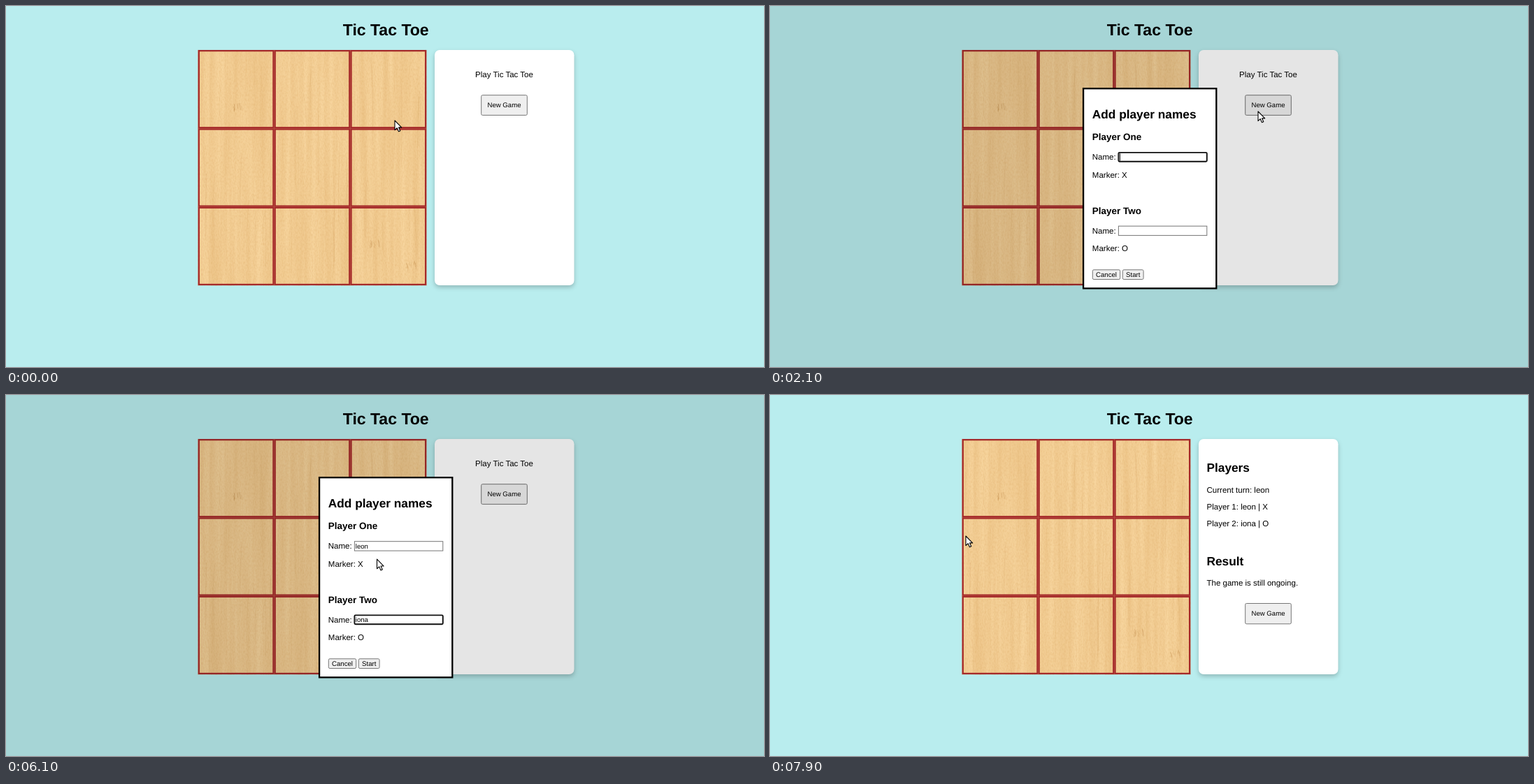
These frames come from a looping animation (1084 by 517 pixels, 8000 ms). An HTML page:

```html
<!DOCTYPE html>
<html lang="en">
<head>
<meta charset="utf-8">
<title>Tic Tac Toe</title>
<style>
  html, body { margin: 0; width: 100%; height: 100%; overflow: hidden; background: #b9edee; }
  svg { display: block; width: 1084px; height: 517px; }
  text { font-family: "Liberation Sans", Arial, sans-serif; font-size: 11.52px; text-rendering: geometricPrecision; white-space: pre; }
  .h1 { font-size: 23.04px; font-weight: bold; }
  .h2 { font-size: 17.28px; font-weight: bold; }
  .h3 { font-size: 13.48px; font-weight: bold; }
  .small { font-size: 9.6px; }
  .mid { text-anchor: middle; }
  .panel { filter: drop-shadow(0 3px 3px rgba(0, 0, 0, .22)); }
</style>
</head>
<body>
<svg id="stage" viewBox="0 0 1084 517">
  <defs>
    <filter id="grain" x="0" y="0" width="1" height="1" color-interpolation-filters="sRGB">
      <feTurbulence type="fractalNoise" baseFrequency=".11 .004" numOctaves="3" seed="8"/>
      <feColorMatrix values="0 0 0 0 .8  0 0 0 0 .56  0 0 0 0 .26  .36 0 0 0 -.08"/>
    </filter>
    <filter id="speck" x="0" y="0" width="1" height="1" color-interpolation-filters="sRGB">
      <feTurbulence type="fractalNoise" baseFrequency=".6 .3" numOctaves="2" seed="3"/>
      <feColorMatrix values="0 0 0 0 .8  0 0 0 0 .56  0 0 0 0 .26  .36 0 0 0 -.13"/>
    </filter>
  </defs>
  <rect width="1084" height="517" fill="#b9edee"/>
  <text class="h1 mid" x="543.2" y="42">Tic Tac Toe</text>
  <g id="board"></g>
  <rect class="panel" x="613" y="63" width="199.5" height="337" rx="7.2" fill="#fff"/>
  <g id="intro"></g>
  <g id="info"></g>
  <rect id="shade" width="1084" height="517" opacity=".1"/>
  <g id="dialog"></g>
  <path id="cursor" d="M0 0V13.6L3.2 10.7L5.5 15.8L7.8 14.8L5.6 9.9H9.7Z" fill="#fff" stroke="#000" stroke-width="1.1" stroke-linejoin="round"/>
</svg>
<script>
const LOOP = 8000, STEP = 100;
const NAMES = ['leon', 'iona'];
const BUTTON_LOOK = { idle: ['#efefef', '#767676'], hover: ['#e5e5e5', '#4f4f4f'], down: ['#f5f5f5', '#8d8d8d'] };
const $ = id => document.getElementById(id);

function add(parent, tag, attrs, text) {
  const el = document.createElementNS('http://www.w3.org/2000/svg', tag);
  set(el, attrs);
  if (text) el.textContent = text;
  return parent.appendChild(el);
}
function set(el, attrs) {
  for (const key in attrs) el.setAttribute(key, attrs[key]);
}
// Baselines sit on whole pixels
const label = (parent, x, y, text, cls = '') => add(parent, 'text', { x, y: Math.round(y), class: cls }, text);
const show = (el, on) => set(el, { visibility: on ? 'visible' : 'hidden' });

function button(parent, x, y, width, height, text) {
  const box = add(parent, 'rect', { x, y, width, height, rx: 1.8 });
  label(parent, x + width / 2, y + height / 2 + 3.2, text, 'small mid');
  const over = (px, py) => px >= x && px <= x + width && py >= y && py <= y + height;
  const draw = (px, py, down) => {
    const [fill, stroke] = BUTTON_LOOK[!over(px, py) ? 'idle' : down ? 'down' : 'hover'];
    set(box, { fill, stroke });
  };
  draw(0, 0);
  return draw;
}

function field(parent, y) {
  const box = add(parent, 'rect', { x: 498.4, width: 126.4, fill: '#fff' });
  const value = label(parent, 499.8, y + 10.5, '', 'small');
  const caret = add(parent, 'rect', { y: y + 1.8, width: .9, height: 10.6 });
  return (text, focus, caretOn) => {
    set(box, focus
      ? { y: y + .6, height: 12.8, rx: 1.4, stroke: '#101010', 'stroke-width': 1.9 }
      : { y: y + .4, height: 13.4, rx: 0, stroke: '#767676', 'stroke-width': 1 });
    value.textContent = text;
    set(caret, { x: 500 + (text ? value.getComputedTextLength() : 0) });
    show(caret, focus && caretOn);
  };
}

function drawBoard(g) {
  const left = 274.7, top = 63, cellW = 108.85, cellH = 112.35, line = 2.2;
  const area = { x: left, y: top, width: 3 * cellW, height: 3 * cellH };
  let seed = 21;
  const rnd = (min, max) => {
    seed = seed * 16807 % 2147483647;
    return min + (max - min) * seed / 2147483647;
  };
  const strand = (x, y, bend, len, opacity) => add(g, 'path', {
    d: `M${x} ${y}q${bend} ${len / 2} ${bend / 2} ${len}`,
    fill: 'none', stroke: '#b98342', 'stroke-opacity': opacity, 'stroke-width': .8
  });

  add(g, 'rect', { ...area, fill: '#f7d59e' });
  for (const id of ['grain', 'speck']) add(g, 'rect', { ...area, filter: `url(#${id})` });
  for (let i = 0; i < 60; i++) {
    const len = rnd(40, 130);
    strand(rnd(left + 4, left + area.width - 4), rnd(top, top + area.height - len), rnd(-6, 6), len, rnd(.06, .17));
  }
  for (const [x, y] of [[333, 146], [527, 342], [579, 372]]) {
    for (let i = 0; i < 7; i++) strand(x + rnd(-8, 8), y - rnd(2, 8), rnd(-3, 5), rnd(5, 12), rnd(.2, .45));
  }

  for (let i = 0; i < 9; i++) {
    add(g, 'rect', {
      x: left + i % 3 * cellW + line / 2, y: top + Math.floor(i / 3) * cellH + line / 2,
      width: cellW - line, height: cellH - line,
      fill: 'none', stroke: '#a52a2a', 'stroke-width': line + .1
    });
  }
}

drawBoard($('board'));

const intro = $('intro'), info = $('info'), dialog = $('dialog');
label(intro, 712.5, 102, 'Play Tic Tac Toe', 'mid');
const newGame = button(intro, 679.7, 127.7, 65.6, 28.7, 'New Game');

label(info, 624.5, 110, 'Players', 'h2');
['Current turn: ' + NAMES[0], `Player 1: ${NAMES[0]} | X`, `Player 2: ${NAMES[1]} | O`]
  .forEach((text, i) => label(info, 624.5, 139.6 + 24.4 * i, text));
label(info, 624.5, 244, 'Result', 'h2');
label(info, 624.5, 273.4, 'The game is still ongoing.');
button(info, 679.7, 298.5, 65.6, 29.3, 'New Game');

add(dialog, 'rect', { x: 448.1, y: 118.2, width: 190.2, height: 286.2, fill: '#fff', stroke: '#000', 'stroke-width': 2.3 });
label(dialog, 460.8, 161, 'Add player names', 'h2');
const fields = [['One', 'X'], ['Two', 'O']].map(([nth, mark], i) => {
  const y = 192.1 + 105.5 * i;
  label(dialog, 460.8, y, 'Player ' + nth, 'h3');
  label(dialog, 460.8, y + 28.1, 'Name:');
  label(dialog, 460.8, y + 53.7, 'Marker: ' + mark);
  return field(dialog, y + 17.2);
});
button(dialog, 461.3, 377.8, 39.4, 13.7, 'Cancel');
const start = button(dialog, 504.3, 377.8, 29.8, 13.7, 'Start');

// Each move is a Bezier curve: begin, end, optional bends, goal
const HOME = [556, 164];
const moves = [
  [300, 1000, [330, 50], [470, 400], [619, 180]],
  [1200, 1900, [698, 151]],
  [2200, 2400, [531, 204]],
  [2900, 3000, [531, 206]],
  [6000, 6600, [528, 381]],
  [6900, 7800, [690, 440], [600, 250], [409, 213]],
  [7800, 7900, [280, 202]]
];

function bezier(points, k) {
  if (points.length === 1) return points[0];
  return bezier(points.slice(1).map((p, i) => p.map((v, axis) => points[i][axis] + (v - points[i][axis]) * k)), k);
}

function pointer(t) {
  let pos = HOME;
  for (const [begin, end, ...points] of moves) {
    if (t > begin) pos = bezier([pos, ...points], Math.min(1, (t - begin) / (end - begin)));
  }
  return pos;
}

const within = (t, from, to) => t >= from && t < to;
// Letters come in two quick pairs
const typed = (name, first, t) => name.slice(0, [0, 100, 300, 350].filter(wait => t >= first + wait).length);

function render(time) {
  const t = Math.floor(time / STEP) * STEP;
  const [x, y] = pointer(t);
  const open = within(t, 2100, 6800);

  show(intro, t < 6800);
  show(info, t >= 6800);
  show($('shade'), open);
  set(dialog, { display: open ? 'inline' : 'none' });

  newGame(open ? 0 : x, y, t >= 2000);
  if (open) {
    start(x, y, t >= 6700);
    fields[0](typed(NAMES[0], 3300, t), t < 4800, !within(t, 3000, 3300) && t < 4300);
    fields[1](typed(NAMES[1], 5200, t), within(t, 4800, 6700), t < 6100 || t >= 6600);
  }
  set($('cursor'), { transform: `translate(${x} ${y})` });
}

const origin = performance.now();
function tick() {
  render((performance.now() - origin) % LOOP);
  requestAnimationFrame(tick);
}
tick();
</script>
</body>
</html>
```
